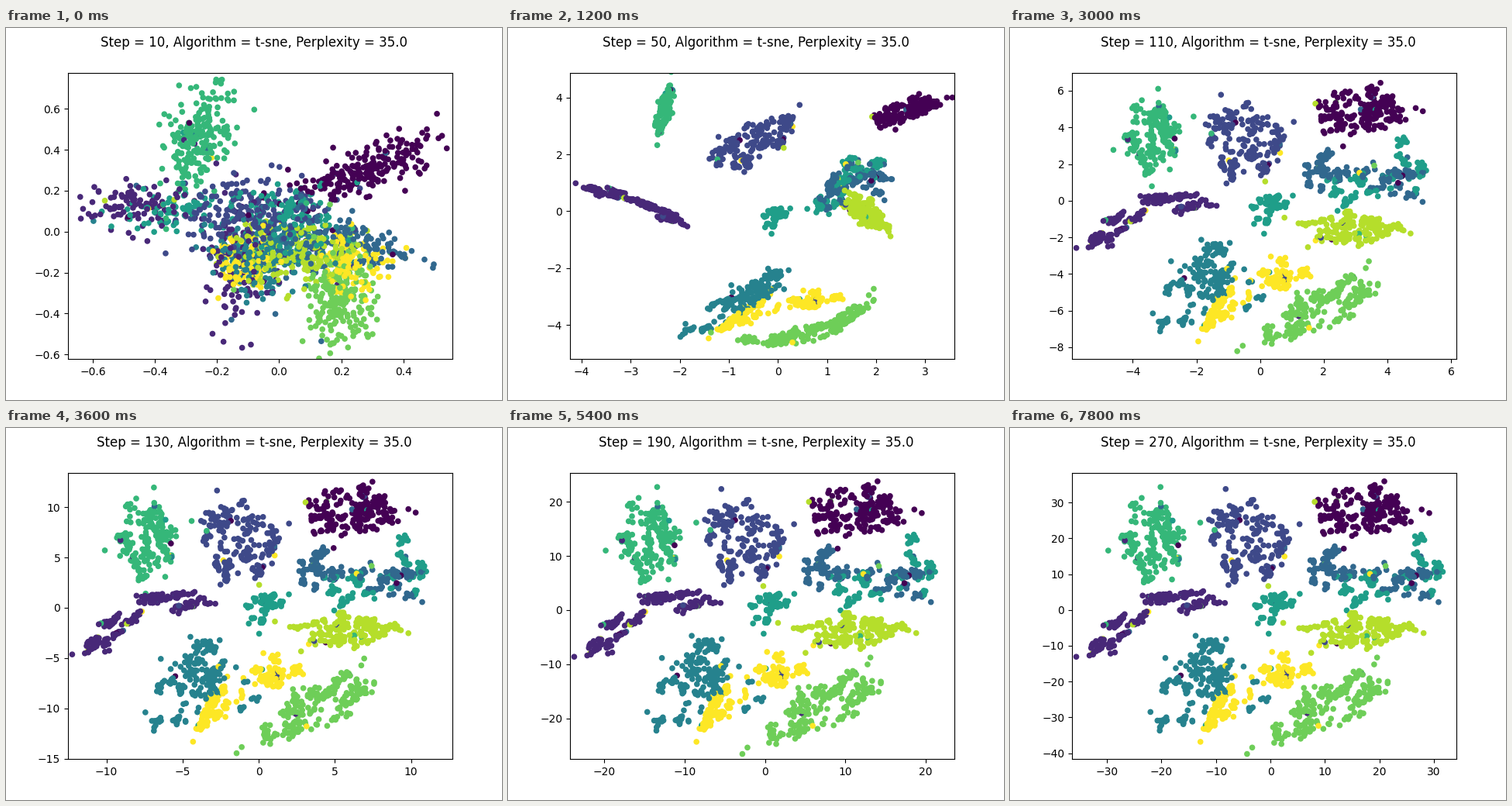
Write a matplotlib script that moves like this. It is 640 px wide and 480 px high and loops after 8000 ms.

```python
import numpy as np
import matplotlib.pyplot as plt
from matplotlib.animation import FuncAnimation

INTERVAL = 100
FRAMES = 80
FRAMES_PER_STEP = 3
SIZES = 5  # points per small clump inside a cluster

rng = np.random.default_rng(35)
labels, tracks = [], []

# left, right, bottom, top at steps 10, 50, 110, 150 and 270
BOUNDS = np.array([
    (-0.6795, 0.5575, -0.6226, 0.7764),
    (-4.239, 3.597, -5.203, 4.881),
    (-5.912, 6.170, -8.646, 6.988),
    (-16.465, 16.560, -18.420, 17.050),
    (-36.40, 34.12, -41.66, 38.33),
])


def stage_at(step):
    """Untangle, stay clumped until about step 100, then grow by a power law."""
    if step <= 50:
        return (step - 10) / 40
    if step <= 110:
        return 1 + ((step - 50) / 60) ** 3
    return np.interp(np.log(step - 105), np.log([5, 45, 165]), [2, 3, 4])


def blend(keys, stage):
    k = min(int(stage), len(keys) - 2)
    return keys[k] + (stage - k) * (keys[k + 1] - keys[k])


def bounds_at(stage):
    return np.sign(BOUNDS[0]) * np.exp(blend(np.log(np.abs(BOUNDS)), stage))


def place(unit, x, y, rx, ry, tilt=0, bend=0):
    """Map unit-disc points to a tilted, optionally bent ellipse in pixels."""
    u, v = unit
    a, b = rx * u, ry * v + bend * (u ** 2 - 0.3)
    c, s = np.cos(np.radians(tilt)), np.sin(np.radians(tilt))
    return np.column_stack([x + a * c - b * s, y + a * s + b * c])


def clumpy_disc(count):
    clumps = count // SIZES
    angle = rng.uniform(0, 2 * np.pi, clumps)
    radius = np.sqrt(rng.random(clumps))
    centres = radius * np.array([np.cos(angle), np.sin(angle)])
    unit = centres[:, rng.integers(0, clumps, count)]
    unit = unit + rng.normal(0, 0.08, (2, count))
    return unit * np.where(rng.random(count) < 0.04, 1.5, 1)


def cluster(label, count, tangled, clumped, settled):
    unit = clumpy_disc(count)
    start = place(rng.normal(0, 0.45, (2, count)), *tangled)
    tight = place(unit, *clumped)
    final = place(unit, *settled)
    spreading = final - 0.03 * (final[:, :1] - 80) * [1, 0]
    released = tight + 0.88 * (spreading - tight)
    tracks.append(np.array([start, tight, released, spreading, final]))
    mixed = rng.random(count) < 0.04
    labels.append(np.where(mixed, rng.integers(0, 10, count), label))


# Ellipses: centre, radii, tilt in degrees, bend
cluster(0, 220, (460, 185, 112, 32, -20), (510, 107, 48, 13, -20), (450, 106, 66, 32, -6))
cluster(1, 110, (165, 230, 75, 32), (135, 213, 36, 5, 13), (138, 260, 46, 14, -38))
cluster(1, 120, (300, 315, 48, 95), (198, 239, 36, 6, 22), (223, 223, 52, 12, -4))
cluster(2, 210, (320, 238, 95, 52), (317, 148, 58, 24, -32), (308, 146, 50, 53))
cluster(3, 100, (370, 270, 65, 50), (430, 207, 34, 20, -40), (416, 185, 28, 32))
cluster(3, 105, (460, 280, 75, 30, 15), (465, 190, 32, 22, 20), (510, 193, 45, 30))
cluster(4, 200, (325, 298, 75, 48), (296, 353, 72, 15, -32), (238, 328, 64, 33, -55))
cluster(4, 20, (340, 290, 70, 50), (325, 335, 35, 15, -30), (320, 345, 40, 28))
cluster(5, 75, (235, 232, 120, 35), (345, 243, 15, 14), (342, 230, 25, 22))
cluster(5, 75, (355, 252, 70, 48), (425, 212, 40, 16, -40), (453, 208, 28, 30))
cluster(5, 60, (375, 250, 60, 45), (450, 188, 38, 22, -25), (530, 185, 28, 46))
cluster(6, 215, (247, 143, 82, 42, -72), (201, 108, 34, 8, -76), (181, 143, 42, 53))
cluster(7, 230, (430, 350, 52, 70), (388, 390, 88, 11, -17, -20), (411, 362, 80, 32, -30))
cluster(8, 210, (370, 288, 100, 45), (460, 237, 42, 16, 42), (450, 263, 76, 22))
cluster(9, 105, (305, 302, 45, 38), (305, 370, 54, 12, -20), (273, 359, 50, 18, -38))
cluster(9, 105, (445, 305, 70, 38, 20), (390, 350, 55, 10, -9), (350, 312, 52, 20, -12))

order = rng.permutation(sum(map(len, labels)))
labels = np.concatenate(labels)[order]
tracks = np.concatenate(tracks, axis=1)[:, order]
# Stage pixels to axes fractions.
tracks = (tracks - [80, 427.2]) / [496, -369.6]

fig = plt.figure(figsize=(6.4, 4.8), dpi=100)
ax = fig.add_subplot()
title = fig.suptitle("")
points = ax.scatter(*tracks[0].T, 20, labels, vmin=0, vmax=9,
                    transform=ax.transAxes)


def update(frame):
    step = 10 * (frame // FRAMES_PER_STEP + 1)
    stage = stage_at(step)
    left, right, bottom, top = bounds_at(stage)
    ax.set(xlim=(left, right), ylim=(bottom, top))
    points.set_offsets(blend(tracks, stage))
    title.set_text(f"Step = {step}, Algorithm = t-sne, Perplexity = 35.0")
    return points, title


animation = FuncAnimation(fig, update, frames=FRAMES, interval=INTERVAL,
                          init_func=lambda: update(0), repeat=True,
                          repeat_delay=0)
plt.show()
```
